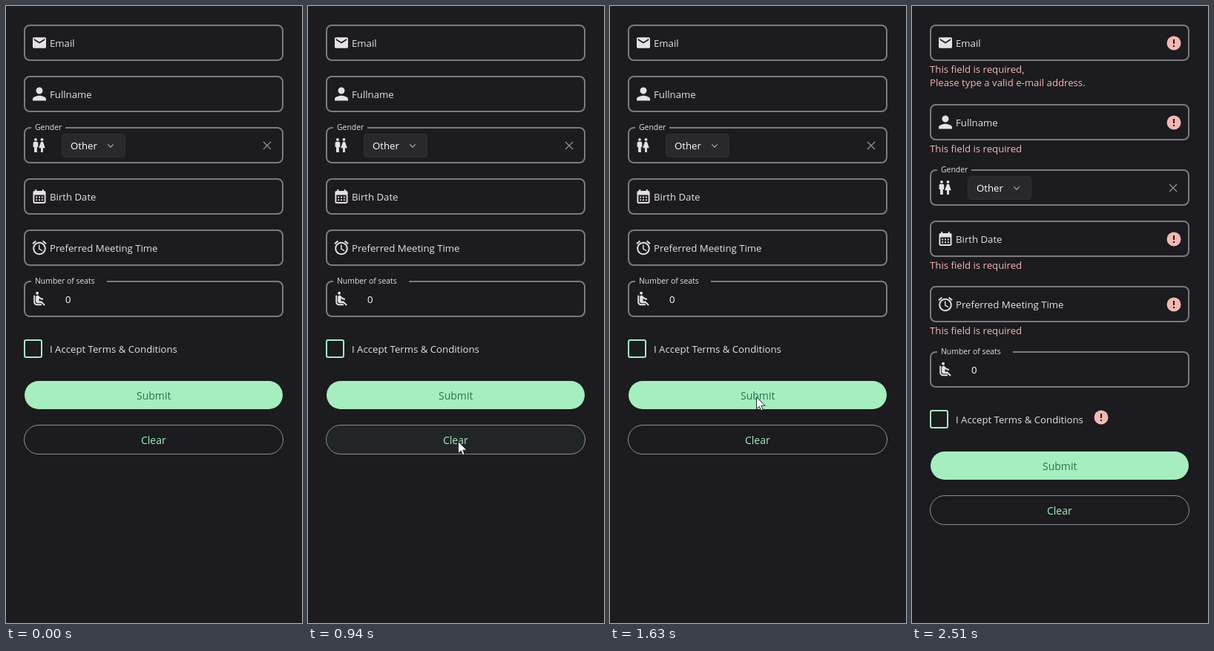
Write an HTML page that moves like this. It is 399 by 831 pixels and loops after 2910 ms.

```html
<!DOCTYPE html>
<html lang="en">
<head>
<meta charset="utf-8">
<title>Form validation</title>
<style>
  html, body { margin: 0; width: 100%; height: 100%; overflow: hidden; background: #1c1b1f; }
  svg { display: block; width: 399px; height: 831px; }
  text { font: 13.2px "Open Sans", sans-serif; fill: #e6e1e5; }
  .legend { font-size: 10.4px; }
  .value { fill: #fff; }
  .button { font-size: 14px; text-anchor: middle; }
  .error { fill: #f2b8b5; }
</style>
</head>
<body>
<svg id="stage" viewBox="0 0 399 831"></svg>
<script>
const LOOP = 2910, ERRORS_AT = 1700;
const BG = '#1c1b1f', INK = '#e6e1e5', LINE = '#7c7a7f', GREEN = '#a6edc0', PINK = '#f2b8b5';

const ICONS = {
  mail: 'M20 4H4c-1.1 0-1.99.9-1.99 2L2 18c0 1.1.9 2 2 2h16c1.1 0 2-.9 2-2V6c0-1.1-.9-2-2-2zm0 4l-8 5-8-5V6l8 5 8-5v2z',
  person: 'M12 12c2.21 0 4-1.79 4-4s-1.79-4-4-4-4 1.79-4 4 1.79 4 4 4zm0 2c-2.67 0-8 1.34-8 4v2h16v-2c0-2.66-5.33-4-8-4z',
  gender: 'M5.5 22v-7.5H4V9c0-1.1.9-2 2-2h3c1.1 0 2 .9 2 2v5.5H9.5V22h-4zM18 22v-6h3l-2.54-7.63C18.18 7.55 17.42 7 16.56 7h-.12c-.86 0-1.63.55-1.9 1.37L12 16h3v6h3zM7.5 6c1.11 0 2-.89 2-2s-.89-2-2-2-2 .89-2 2 .89 2 2 2zm9 0c1.11 0 2-.89 2-2s-.89-2-2-2-2 .89-2 2 .89 2 2 2z',
  date: 'M19 4h-1V2h-2v2H8V2H6v2H5c-1.1 0-2 .9-2 2v14c0 1.1.9 2 2 2h14c1.1 0 2-.9 2-2V6c0-1.1-.9-2-2-2zm0 16H5V10h14v10zM9 14H7v-2h2v2zm4 0h-2v-2h2v2zm4 0h-2v-2h2v2zm-8 4H7v-2h2v2zm4 0h-2v-2h2v2zm4 0h-2v-2h2v2z',
  alarm: 'M22 5.72l-4.6-3.86-1.29 1.53 4.6 3.86L22 5.72zM7.88 3.39L6.6 1.86 2 5.71l1.29 1.53 4.59-3.85zM12.5 8H11v6l4.75 2.85.75-1.23-4-2.37V8zM12 4c-4.97 0-9 4.03-9 9s4.02 9 9 9 9-4.03 9-9-4.03-9-9-9zm0 16c-3.87 0-7-3.13-7-7s3.13-7 7-7 7 3.13 7 7-3.13 7-7 7z',
  seat: 'M7.59 5.41c-.78-.78-.78-2.05 0-2.83.78-.78 2.05-.78 2.83 0 .78.78.78 2.05 0 2.83-.79.79-2.05.79-2.83 0zM6 16V7H4v9c0 2.76 2.24 5 5 5h6v-2H9c-1.66 0-3-1.34-3-3zm14 4.07L14.93 15H11.5v-3.68c1.4 1.15 3.6 2.16 5.5 2.16v-2.16c-1.66.02-3.61-.87-4.67-2.04l-1.4-1.55c-.19-.21-.43-.38-.69-.5-.29-.14-.62-.23-.96-.23h-.03C8.01 7 7 8.01 7 9.25V15c0 1.66 1.34 3 3 3h5.07l3.5 3.5L20 20.07z'
};

const text = (x, y, str, cls = '') => `<text x="${x}" y="${y}" class="${cls}">${str}</text>`;
const box = (x, y, w, h, r, attrs) => `<rect x="${x}" y="${y}" width="${w}" height="${h}" rx="${r}" ${attrs}/>`;
const stroke = (d, color, width) => `<path d="${d}" fill="none" stroke="${color}" stroke-width="${width}"/>`;
const icon = (name, scale, x = 45, y = 24.5) =>
  `<path d="${ICONS[name]}" fill="${INK}" transform="translate(${x} ${y}) scale(${scale}) translate(-12 -12)"/>`;
const alertMark = (x, y) => `<g class="alert"><circle cx="${x}" cy="${y}" r="9.5" fill="${PINK}"/>` +
  stroke(`M${x} ${y - 5}v6M${x} ${y + 3}v2`, BG, 2) + '</g>';

const frame = box(25, 1, 348, 47, 7, `fill="none" stroke="${LINE}" stroke-width="2"`);
const notch = (right, label) => box(34, -1, right - 34, 4, 0, `fill="${BG}"`) + text(39, 3.7, label, 'legend');
const field = (name, scale, label, ...errors) =>
  frame + icon(name, scale) + text(59, 30, label) + alertMark(353, 25) +
  `<g class="alert">${errors.map((e, i) => text(24, 65 + 18 * i, e, 'error')).join('')}</g>`;

const REQUIRED = 'This field is required';

// Each row: top edge, shift once errors are shown, content.
const rows = [
  [25, 0, field('mail', .9, 'Email', REQUIRED + ',', 'Please type a valid e-mail address.')],
  [94, 38, field('person', 1.125, 'Fullname', REQUIRED)],
  [163, 57, frame + notch(80, 'Gender') + icon('gender', .95, 44.2) +
    box(75.5, 9.5, 85, 31, 4, 'fill="#29282c" stroke="#302f33"') + text(87, 30, 'Other', 'value') +
    stroke('M137.3 23.4l3.7 3.7 3.7-3.7', '#b5b2b8', 1.1) +
    stroke('M347 20l10 10M357 20l-10 10', '#8f8d93', 1.4)],
  [232, 57, field('date', .95, 'Birth Date', REQUIRED)],
  [301, 76, field('alarm', .97, 'Preferred Meeting Time', REQUIRED)],
  [370, 95, frame + notch(136, 'Number of seats') + icon('seat', .97) + text(80, 30, '0', 'value')],
  [449, 95, box(25, 1, 23, 23, 2, `fill="none" stroke="${GREEN}" stroke-width="2"`) +
    text(59, 18, 'I Accept Terms &amp; Conditions') + alertMark(255, 10)],
  [505, 95, box(25, 0, 348, 38, 19, `fill="${GREEN}"`) +
    '<text x="199.2" y="25" class="button" style="fill:#25774d">Submit</text>'],
  [564, 95, box(24.5, .5, 349, 39, 19.5, `id="tint" fill="${GREEN}"`) +
    box(24.5, .5, 349, 39, 19.5, 'fill="none" stroke="#8f8e94"') +
    `<text x="198.8" y="26" class="button" style="fill:${GREEN}">Clear</text>`]
];

const stage = document.getElementById('stage');
stage.innerHTML = box(0, 0, 399, 831, 0, `fill="${BG}"`) +
  rows.map(r => `<g class="row">${r[2]}</g>`).join('') +
  '<path id="cursor" d="M.5 .5V16.7L4.2 13.2 6.7 18.8 9.2 17.7 6.8 12.2H12Z" fill="#fff" stroke="#111" stroke-width=".9"/>';

const rowEls = stage.querySelectorAll('.row');
const alerts = stage.querySelectorAll('.alert');
const cursor = document.getElementById('cursor');
const tint = document.getElementById('tint');

// Pointer legs, each played in eight discrete positions.
const legs = [
  { a: 200, b: 270, from: [360, 805], to: [359, 805], ease: k => k },
  { a: 470, b: 940, from: [358.5, 805.5], to: [202, 586], ease: k => k * k * (3 - 2 * k) },
  { a: 1010, b: 1490, from: [200, 568], to: [197, 526], ease: k => 1 - (1 - k) ** 3.6 },
  { a: 2030, b: 2510, from: [236, 589], to: [346, 838], ease: k => k }
];

function pointer(t) {
  const leg = legs.filter(l => t >= l.a).pop();
  if (!leg || t >= 2510) return null;
  const k = Math.min(7, Math.floor((t - leg.a + 9) / (leg.b - leg.a) * 7)) / 7;
  const e = leg.ease(k);
  return leg.from.map((v, i) => v + (leg.to[i] - v) * e);
}

// Hover tint of the Clear button: [time, opacity], held until the next entry.
const hover = [[0, 0], [940, .045], [1010, .09], [1070, .12], [1140, .08], [1210, .03], [1280, 0],
  [2170, .03], [2230, .06], [2300, .03], [2370, 0]];

function draw(t) {
  const failed = t >= ERRORS_AT;
  rows.forEach(([y, shift], i) => rowEls[i].setAttribute('transform', `translate(0 ${y + (failed ? shift : 0)})`));
  alerts.forEach(el => el.setAttribute('visibility', failed ? 'visible' : 'hidden'));
  tint.setAttribute('fill-opacity', hover.filter(h => t >= h[0]).pop()[1]);
  const p = pointer(t);
  cursor.setAttribute('visibility', p ? 'visible' : 'hidden');
  if (p) cursor.setAttribute('transform', `translate(${p[0]} ${p[1]})`);
}

const start = performance.now();
function tick() {
  draw((performance.now() - start) % LOOP);
  requestAnimationFrame(tick);
}
tick();
</script>
</body>
</html>
```
